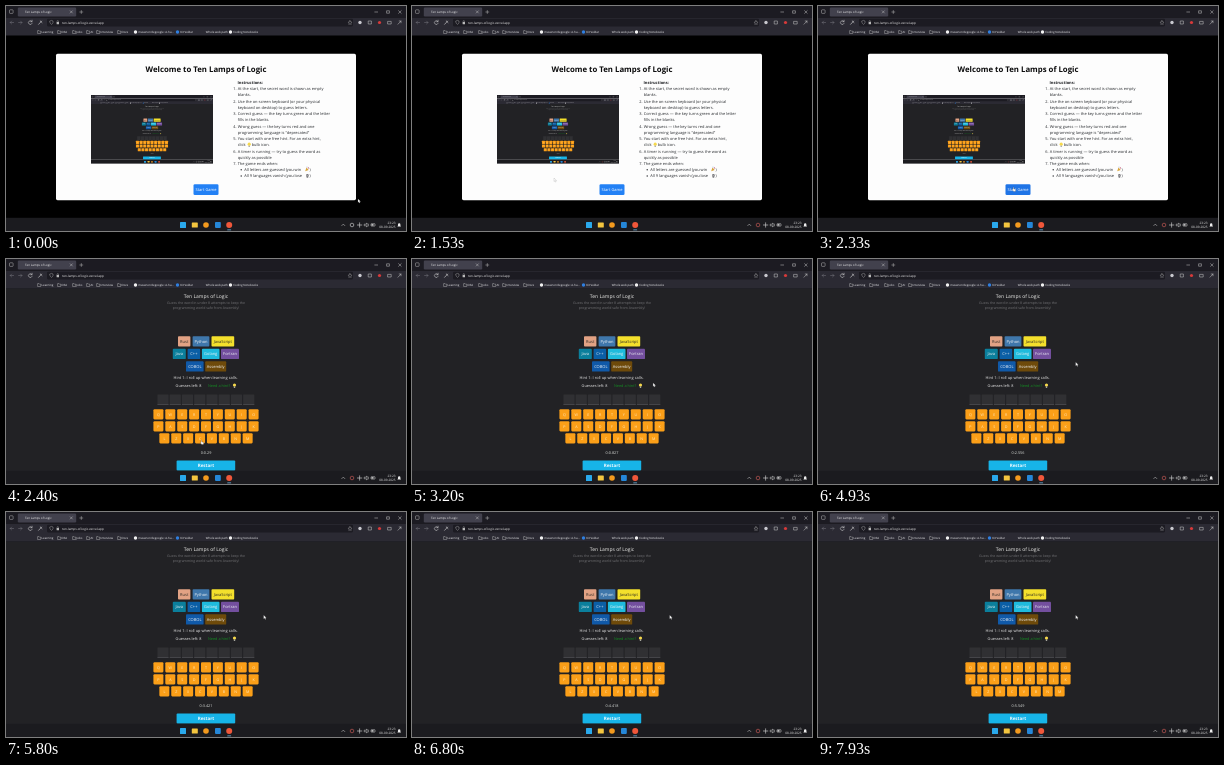
An HTML page for the animation above (8000 ms loop, 400 px wide and 225 px high).

```html
<!DOCTYPE html>
<html lang="en">
<head>
<meta charset="utf-8">
<title>Ten Lamps of Logic</title>
<style>
  html, body { margin: 0; width: 100%; height: 100%; overflow: hidden; background: #000; }
  svg { display: block; width: 100vw; height: 100vh; }
  text { font-family: "Open Sans", "Noto Sans", sans-serif; text-rendering: geometricPrecision; white-space: pre; }
</style>
</head>
<body>
<svg id="stage" viewBox="0 0 400 225"></svg>
<script>
const LOOP = 8000, STEP = 200 / 3, GAME_START = 2400;
const NAME = "Ten Lamps of Logic";

const rect = (x, y, w, h, fill, r = 0, more = "") =>
  `<rect x="${x}" y="${y}" width="${w}" height="${h}" rx="${r}" fill="${fill}" ${more}/>`;
const dot = (x, y, r, fill) => `<circle cx="${x}" cy="${y}" r="${r}" fill="${fill}"/>`;
const line = (d, stroke = "#ccc", w = 0.6) =>
  `<path d="${d}" fill="none" stroke="${stroke}" stroke-width="${w}" stroke-linecap="round" stroke-linejoin="round"/>`;
const text = (x, y, s, size, fill, more = "") =>
  `<text x="${x}" y="${y}" font-size="${size}" fill="${fill}" ${more}>${s}</text>`;
const mid = (x, y, s, size, fill, more = "") => text(x, y, s, size, fill, `text-anchor="middle" ${more}`);
const bulb = (x, y) => dot(x, y - 0.6, 1.6, "#f6d94c") + rect(x - 0.7, y + 0.8, 1.4, 1.5, "#a8a8a0", 0.3);
const MEDIUM = 'font-weight="500"', BOLD = 'font-weight="700"';

function chrome() {
  let s = rect(0, 0, 400, 11.5, "#1c1b22") + rect(0, 11.5, 400, 18, "#2b2a33");
  s += rect(3.5, 3.8, 3.6, 3.6, "none", 0.7, 'stroke="#bbb" stroke-width=".5"');
  s += rect(11.8, 1.6, 58.4, 8.8, "#42414d", 1.2);
  s += text(19, 7, NAME, 3, "#f4f4f4");
  s += line("M64.2 4.8l2.2 2.2m0-2.2l-2.2 2.2M73.8 6h3M75.3 4.5v3", "#ccc", 0.45);
  s += line("M368.8 6h2.8M392.6 4.7l2.6 2.6m0-2.6l-2.6 2.6M381 4.8h2.4v2.4h-2.4z", "#ddd", 0.45);

  s += line("M7.6 16.5h-3.4m1.4-1.4l-1.4 1.4 1.4 1.4M12.6 16.5h3.4m-1.4-1.4l1.4 1.4-1.4 1.4", "#77767e", 0.5);
  s += line("M26 15.6a1.9 1.9 0 1 0 .1 1.8m0-3.2v1.5h-1.5", "#ddd", 0.5);
  s += line("M32.6 18.3l3-3.2m-1.4-.2l1.8 1.7", "#ddd", 0.6);
  s += rect(41, 12.8, 306, 7.6, "#1c1b22", 1.1);
  s += line("M44 15l1.5-.6 1.5.6v1.6q-.5 1.3-1.5 1.8-1-.5-1.5-1.8z", "#bbb", 0.4);
  s += rect(50.6, 16, 2.4, 2.2, "#bbb", 0.3) + line("M51.1 16v-.7a.7.7 0 0 1 1.4 0v.7", "#bbb", 0.4);
  s += text(56.2, 17.7, "ten-lamps-of-logic.vercel.app", 3.1, "#f4f4f4");
  s += line("M344 14.6l.6 1.3 1.4.2-1 1 .2 1.4-1.2-.7-1.2.7.2-1.4-1-1 1.4-.2z", "#bbb", 0.35);
  s += line("M362.6 15h2.8v3h-2.8zM382 18h3.2v-2.6h-3.2zM392 18.2l3-3.2m-1.8 0h1.8v1.8", "#ccc", 0.5);
  s += dot(354, 16.5, 1.7, "#c9c9cf") + dot(373.5, 16.5, 1.6, "#d83a3a");

  const folders = [[32, "Learning"], [52, "DSA"], [67, "Jobs"], [81, "AI"], [91, "Interview"], [112, "Docs"]];
  for (const [x, label] of folders)
    s += line(`M${x} 24.6h1l.4.5h1.3v2.4h-2.7z`, "#ccc", 0.4) + text(x + 3.6, 27.1, label, 2.9, "#f0f0f3");
  const marks = [[128, "mavenor/degoogle: A-hu...", "#f2f2f2"], [170, "Kit Veldar", "#2f7fe0"],
    [195.6, "Whole web path", ""], [223, "Coding Notebooks", "#f2f2f2"]];
  for (const [x, label, fill] of marks)
    s += (fill ? dot(x + 1.5, 26, 1.7, fill) : "") + text(x + 4.2, 27.1, label, 2.9, "#f0f0f3");
  return s;
}

function taskbar() {
  let s = rect(0, 211.8, 400, 13.2, "#1b1b1f");
  s += rect(174, 216, 6, 6, "#2aa9ec", 0.5);
  s += rect(185.8, 216.5, 6, 5, "#f3c53f", 0.6);
  s += dot(200, 219, 2.8, "#f39a1e");
  s += rect(209, 216.1, 5.8, 5.8, "#2587d8", 0.8);
  s += dot(223.2, 219, 3, "#f0573a") + rect(221.2, 223.6, 4, 0.6, "#71b9e8", 0.3);
  s += line("M335.8 219.6l1.5-1.5 1.5 1.5", "#ddd", 0.5);
  s += `<circle id="tray" cx="346" cy="219" r="1.8" fill="none" stroke="#ddd" stroke-width=".6"/>`;
  s += line("M351.4 219h4.4m-2.2-2.2v4.4", "#ddd", 0.6);
  s += line("M358.6 218.2h1l1.3-1.2v4l-1.3-1.2h-1zM362.2 217.8q.9 1.2 0 2.4", "#ddd", 0.5);
  s += rect(365, 217.7, 4, 2.4, "none", 0.4, 'stroke="#ddd" stroke-width=".5"') + rect(365.5, 218.2, 2, 1.4, "#ddd");
  const end = 'text-anchor="end"';
  return s + text(389.5, 217.9, "23:23", 3.1, "#eee", end) + text(389.5, 222.3, "08-09-2025", 3.1, "#eee", end)
    + `<path d="M391.4 220.4h3.6l-.6-1v-1a1.2 1.2 0 0 0-2.4 0v1z" fill="#eee"/>`;
}

function game() {
  let s = rect(0, 29.3, 400, 182.7, "#222225");
  s += mid(200, 39.1, NAME, 5, "#efefec", MEDIUM);
  s += mid(200, 45, "Guess the word in under 8 attempts to keep the", 3.5, "#747477");
  s += mid(200, 50.3, "programming world safe from Assembly!", 3.5, "#747477");

  const tags = [
    [172, 77.2, 12.4, "Rust", "#e2a284"], [186.6, 77.2, 16.8, "Python", "#3f77ab"],
    [205.5, 77.2, 22.7, "JavaScript", "#f4e02c"],
    [166.8, 89.8, 13, "Java", "#0b7f9c"], [181.6, 89.8, 12.6, "C++", "#0b5fa6"],
    [195.9, 89.8, 17.6, "Golang", "#1fbbdd"], [215, 89.8, 18, "Fortran", "#734f9e"],
    [180, 102.3, 17.6, "COBOL", "#1059a8"], [199.2, 102.3, 21, "Assembly", "#6e4a0a"]];
  for (const [x, y, w, label, fill] of tags) {
    const ink = /Rust|JavaS/.test(label) ? "#2a2722" : "#f0f4f6";
    s += rect(x, y, w, 10.3, fill, 0.9) + mid(x + w / 2, y + 6.6, label, 4, ink, MEDIUM);
  }

  s += mid(199.6, 119.6, "Hint 1: I roll up when learning calls.", 3.95, "#ececec");
  s += text(169.6, 128.3, "Guesses left: 8", 3.85, "#ececec");
  s += text(202, 128.3, "Need a hint?", 3.8, "#139022") + bulb(228.5, 126.7);

  for (let i = 0; i < 8; i++)
    s += rect(151.4 + i * 12.25, 135.4, 11.2, 10.4, "#303033", 0.4)
      + rect(151.4 + i * 12.25, 145.4, 11.2, 0.6, "#55555a");

  ["QWERTYUIO", "PASDFGHJK", "LZXCVBNM"].forEach((row, r) => {
    const y = 150.2 + r * 12;
    [...row].forEach((key, i) => {
      const x = 200 + (i - (row.length - 1) / 2) * 11.9;
      s += rect(x - 5, y, 10, 10.2, "#fb9f18", 1.1) + mid(x, y + 6.5, key, 3.7, "#ffe9bf");
    });
  });

  s += `<text id="timer" x="200" y="194.7" font-size="3.8" fill="#dfe3df" text-anchor="middle"></text>`;
  return s + rect(170.6, 201.6, 58.6, 9.8, "#17b4e8", 1)
    + mid(200, 208, "Restart", 4.5, "#f2fbff", BOLD);
}

function welcome() {
  let s = rect(0, 29.3, 400, 182.7, "#000") + rect(50, 47.8, 300, 146.4, "#fdfdfd", 1.6);
  s += mid(200, 66.3, "Welcome to " + NAME, 7.8, "#0b0b0c", BOLD);
  s += `<g transform="translate(85 89) scale(.305)">
    <use href="#game"/><use href="#chrome"/><use href="#taskbar"/></g>`;
  s += text(231.5, 77.8, "Instructions:", 4, "#1b1d20", BOLD);
  const lines = [
    "1.At the start, the secret word is shown as empty", "blanks.",
    "2.Use the on-screen keyboard (or your physical", "keyboard on desktop) to guess letters.",
    "3.Correct guess — the key turns green and the letter", "fills in the blanks.",
    "4.Wrong guess — the key turns red and one", "programming language is \"deprecated\"",
    "5.You start with one free hint. For an extra hint,", "click      bulb icon.",
    "6.A timer is running — try to guess the word as", "quickly as possible",
    "7.The game ends when:", "•All letters are guessed (you win", "•All 9 languages vanish (you lose"];
  lines.forEach((str, i) => {
    const y = 84.2 + i * 6.23, bullet = str[0] === "•";
    const num = /^\d\./.test(str) ? str.slice(0, 2) : "";
    if (num) s += text(230.6, y, num, 3.95, "#24272b", 'text-anchor="end"');
    if (bullet) s += dot(235.2, y - 1.4, 0.7, "#24272b") + text(303.6, y, ")", 3.95, "#24272b");
    s += text(bullet ? 238.3 : 231.7, y, str.slice(bullet ? 1 : num.length), 3.95, "#24272b");
  });
  s += bulb(243.2, 138.8);
  s += `<path d="M299.2 165.2l1.2-3.6 2.3 2.4z" fill="#d8a53a"/>` + dot(302.4, 161.9, 0.6, "#c65b7c") + dot(301, 161, 0.4, "#5b8fc6");
  s += dot(301.4, 169.4, 1.4, "#77777b") + rect(300.6, 170.3, 1.6, 1.4, "#77777b", 0.2)
    + dot(300.9, 169.4, 0.35, "#fff") + dot(301.9, 169.4, 0.35, "#fff");
  return s + `<rect id="start" x="187.5" y="178.3" width="25" height="10.8" rx="1.3"/>`
    + mid(200, 185.2, "Start Game", 4, "#fff");
}

const group = (id, body) => `<g id="${id}">${body}</g>`;
document.getElementById("stage").innerHTML =
  group("welcome", welcome())
  + group("play", group("game", game()))
  + group("chrome", chrome()) + group("taskbar", taskbar())
  + `<g id="cursor">
      <path id="arrow" d="M0 0v3.5l.8-.7.7 1.3.6-.3-.6-1.3h1.1z" fill="#fff" stroke="#777" stroke-width=".2"/>
      <path id="hand" d="M0 0q.4-.5.8 0v1.4l1.6.4q.4.2.3.7l-.3 1.4h-1.7l-1.4-1.7q.1-.5.7-.1z" fill="#fff" stroke="#222" stroke-width=".25"/>
    </g>`;

const el = id => document.getElementById(id);
const show = (id, on) => el(id).setAttribute("display", on ? "inline" : "none");

// time, x, y of the pointer tip
const path = [[0, 352, 193], [70, 352, 193], [870, 262, 115], [1300, 205, 162], [1530, 142, 172],
  [1730, 133, 184], [2260, 195, 181.5], [2670, 195, 181.5], [3470, 257.7, 103.3], [LOOP, 257.7, 103.3]];

function pointer(t) {
  const i = path.findIndex(p => p[0] > t);
  const [t0, x0, y0] = path[i - 1], [t1, x1, y1] = path[i];
  const u = (t - t0) / (t1 - t0), k = u * u * (3 - 2 * u);
  return [x0 + (x1 - x0) * k, y0 + (y1 - y0) * k];
}

function draw(now) {
  const t = Math.floor((now % LOOP + 5) / STEP) * STEP % LOOP;
  const playing = t >= GAME_START - 1;
  show("welcome", !playing);
  show("play", playing);

  const ms = playing ? Math.round(29 + (t - GAME_START) * 0.9976) : 0;
  el("timer").textContent = `0:${Math.floor(ms / 1000)}.${ms % 1000}`;

  const [x, y] = pointer(t);
  const hover = t > 2190 && t < 2730;
  el("cursor").setAttribute("transform", `translate(${x} ${y})`);
  show("hand", hover);
  show("arrow", !hover);
  el("start").setAttribute("fill", hover ? "#1f74e6" : "#2381f5");
  el("tray").setAttribute("stroke", t > 800 ? "#d9605c" : "#ddd");
}

function tick(now) {
  draw(now);
  requestAnimationFrame(tick);
}
draw(0);
requestAnimationFrame(tick);
</script>
</body>
</html>
```
